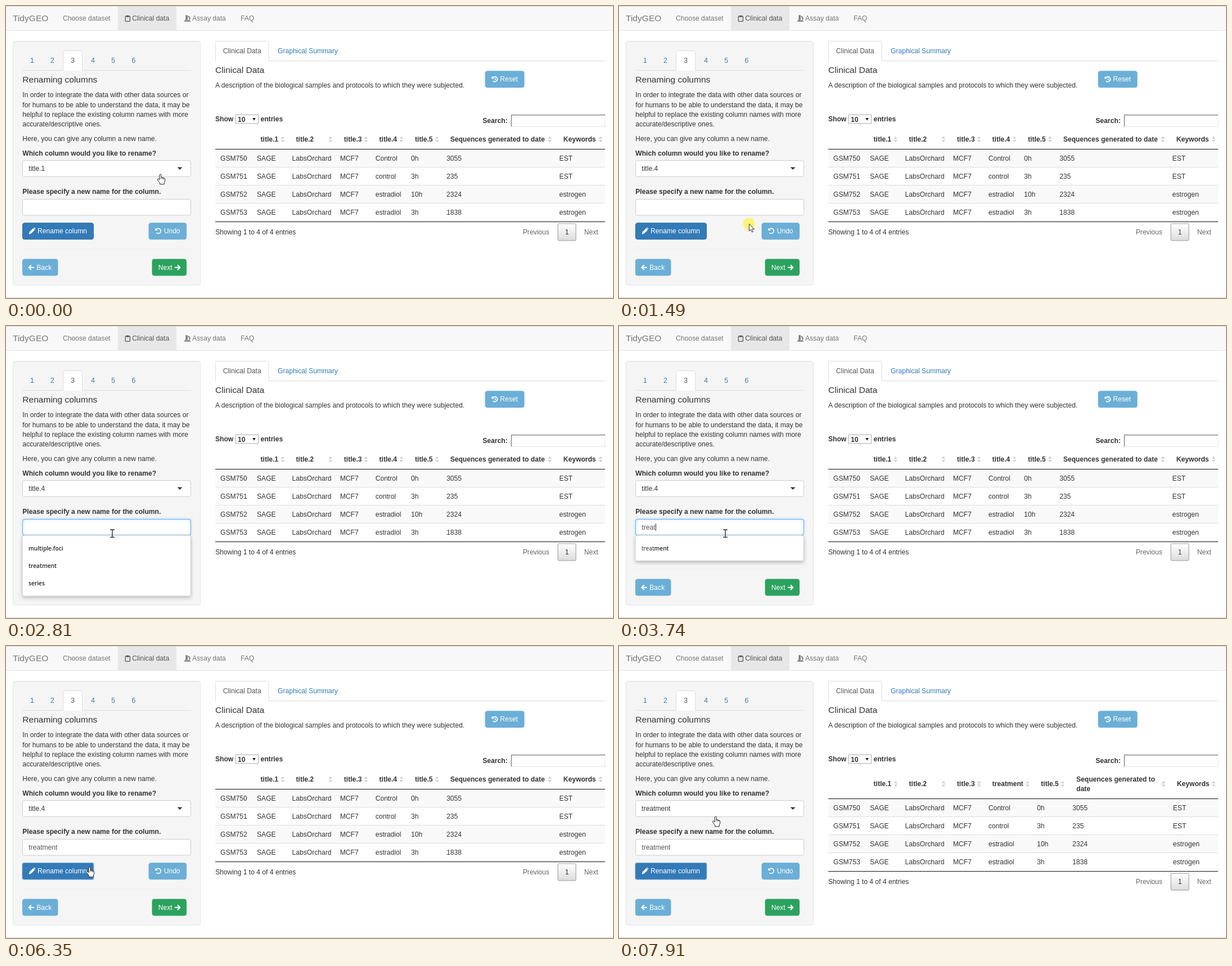
Recreate the animation shown at these times as an HTML page. Size 1079x519 px, loop 7.99 s.

```html
<!DOCTYPE html>
<html lang="en">
<head>
<meta charset="utf-8">
<title>Renaming columns</title>
<style>
html, body { margin: 0; width: 100%; height: 100%; overflow: hidden; background: #fff; }
svg { display: block; width: 1079px; height: 519px; }
text { font: 12.1px "Liberation Sans", Arial, sans-serif; fill: #333; white-space: pre; }
.h { font-size: 15.55px; }
.b { font-weight: 700; }
.mid { text-anchor: middle; }
.nav { fill: #777; }
.dark { fill: #555; }
.link { fill: #337ab7; }
.page { fill: #666; }
.w { fill: #fff; }
.hint { font: 600 10.2px "Open Sans", "Noto Sans", sans-serif; fill: #222; }
.typed { font-weight: 400; }
</style>
</head>
<body>
<svg id="stage" viewBox="0 0 1079 519" xmlns="http://www.w3.org/2000/svg"></svg>
<script>
const LOOP = 7990;
const COLUMNS = ['title.1', 'title.2', 'title.3', 'title.4', 'title.5',
  'Sequences generated to date', 'Keywords'];
const HINTS = ['multiple.foci', 'treatment', 'series'];
const WORD = 'treatment';
const KEYS = [3190, 3340, 3430, 3580, 3740, 4200, 4280, 4430, 4520];
const CLICKS = [[150, 240], [1490, 1560], [2260, 2340], [6210, 6290]];
// start, end, number of steps, destination
const MOVES = [
  [530, 1250, 10, 231, 387],
  [1710, 2090, 6, 189, 368.5],
  [5440, 6130, 10, 148.5, 392.7],
  [7060, 7910, 12, 171.6, 302.8]
];
const HOME = [274.5, 298.8];
const OPTION_TOP = 307, OPTION_H = 22.46;

// y is the vertical centre of the line
const text = (x, y, s, cls = '', id = '') =>
  `<text x="${x}" y="${y + 4.3}" class="${cls}"${id && ` id="${id}"`}>${s}</text>`;
const rect = (x, y, w, h, fill, stroke = 'none', r = 0, more = '') =>
  `<rect x="${x}" y="${y}" width="${w}" height="${h}" rx="${r}" fill="${fill}" stroke="${stroke}" ${more}/>`;
const path = (d, fill = 'none', stroke = 'none', width = 1, more = '') =>
  `<path d="${d}" fill="${fill}" stroke="${stroke}" stroke-width="${width}" ${more}/>`;
const line = (x1, x2, y, color) => path(`M${x1} ${y}H${x2}`, 'none', color);
const group = (body, id = '', at = '') =>
  `<g${id && ` id="${id}"`}${at && ` transform="translate(${at})"`}>${body}</g>`;
const button = (x, y, w, fill, stroke = fill) => rect(x, y, w, 29, fill, stroke, 3.5);
const field = y => rect(29.5, y, 299, 28.5, '#fff', '#ccc', 3.5);
const glow = (y, id) => rect(29.5, y, 299, 28.5, 'none', '#66afe9', 3.5, `id="${id}" filter="url(#blue)"`);

const undoIcon = (x, y, inner = '') => group(
  path('M-3.8-2.4A4.5 4.5 0 1 1-3.2 3.3', 'none', '#fff', 1.7) +
  path('M-5.7-5.3V-.8H-1.2Z', '#fff') + inner, '', `${x} ${y}`);

const arrowIcon = (x, y, flip) =>
  path('M-.2-4.3L-4.4 0L-.2 4.3M-4 0H5', 'none', '#fff', 2,
    `transform="translate(${x} ${y}) scale(${flip} 1)"`);

function navbar() {
  return rect(0, 0, 1079, 44, '#f8f8f8') + rect(199, 1, 104, 43, '#e7e7e7') +
    line(0, 1079, 43.5, '#e4e4e4') + line(0, 1079, .5, '#cfcfcf') + line(0, 1079, 518.5, '#d2d2d2') +
    text(12, 22.5, 'TidyGEO', 'h nav') +
    text(101, 22, 'Choose dataset', 'nav') + text(224.3, 22, 'Clinical data', 'dark') +
    text(331, 22, 'Assay data', 'nav') + text(417, 22, 'FAQ', 'nav') +
    rect(212.2, 18, 8.2, 9.3, 'none', '#555', 1, 'stroke-width="1.3"') +
    path('M214 19.8V17.4H215.2Q216.3 15 217.4 17.4H218.6V19.8Z', '#555') +
    group(path('M-3-5.8H.2V2H-3ZM-2.4 2.6H-.4V3.6H-2.4Z', '#777') +
      path('M.8-3.6Q4.4-2.8 4.2.6Q4 3 2 4.6', 'none', '#777', 1.6) +
      path('M-5.6 5H5.6M-4.6 3.2H.8', 'none', '#777', 1.5), '', '322.5 22');
}

function panel() {
  const copy = ['In order to integrate the data with other data sources or',
    'for humans to be able to understand the data, it may be',
    'helpful to replace the existing column names with more',
    'accurate/descriptive ones.'];
  let s = rect(12.5, 62.5, 333, 433.5, '#f5f5f5', '#e3e3e3', 3.5) +
    line(14, 344, 63.5, '#eeeeee') + line(29, 328.5, 114.5, '#ddd') +
    path('M101.5 115V83Q101.5 79.5 105 79.5H132Q135.5 79.5 135.5 83V115', '#fff', '#ddd');
  for (let i = 0; i < 6; i++)
    s += text(46.3 + 36.1 * i, 97, i + 1, 'mid ' + (i === 2 ? 'dark' : 'link'));
  s += text(29.3, 132, 'Renaming columns', 'h');
  copy.forEach((c, i) => s += text(29.3, 158 + 17.3 * i, c));
  return s + text(29.3, 236, 'Here, you can give any column a new name.') +
    text(29.3, 261.5, 'Which column would you like to rename?', 'b') +
    field(274.7) + glow(274.7, 'selectGlow') + text(40.3, 289, '', '', 'chosen') +
    path('M304.5 286.5H313.5L309 291Z', '#333', 'none', 1, 'id="down"') +
    path('M304.5 291H313.5L309 286.5Z', '#333', 'none', 1, 'id="up"') +
    rect(75, 282.5, 1, 13, '#333', 'none', 0, 'id="selectCaret"') +
    text(29.3, 330, 'Please specify a new name for the column.', 'b') +
    field(343.5) + glow(343.5, 'inputGlow') + text(40.3, 357.5, '', 'dark', 'typed') +
    rect(40.8, 351, 1, 13, '#333', 'none', 0, 'id="caret"') +
    button(29.5, 385.7, 126, '#337ab7', '#2e6da4') +
    rect(28.9, 385.3, 127, 29.8, 'none', '#8bb9e6', 1.5, 'id="ring"') +
    group(path('M-5.5 5.5L-4.7 1.8L2-4.9L5-1.9L-1.8 4.8Z', '#fff') +
      path('M2.7-5.5L3.4-6Q4-6.4 4.7-5.8L5.8-4.7Q6.3-4 5.8-3.3L5.4-2.8Z', '#fff') +
      path('M-3.7 2.1L-2 3.9', 'none', '#337ab7', .8), '', '46.2 400') +
    text(56, 400, 'Rename column', 'w') +
    button(254, 385.7, 66.5, '#6baed6') + undoIcon(270.7, 399.7) + text(280.7, 400, 'Undo', 'w') +
    line(29, 328.5, 432.5, '#eee') +
    button(29.5, 450, 62.5, '#6baed6') + arrowIcon(45, 464.7, 1) + text(54.3, 464.5, 'Back', 'w') +
    button(260, 450, 60.5, '#2ca25f') + arrowIcon(304.8, 464.7, -1) + text(270.8, 464.5, 'Next', 'w');
}

function content() {
  return line(372, 1065, 97.5, '#ddd') +
    path('M372.5 98V66Q372.5 62.5 376 62.5H463.5Q467 62.5 467 66V98', '#fff', '#ddd') +
    text(385.8, 79.7, 'Clinical Data', 'dark') + text(483, 79.7, 'Graphical Summary', 'link') +
    text(372, 114.5, 'Clinical Data', 'h') +
    text(372, 141, 'A description of the biological samples and protocols to which they were subjected.') +
    button(852, 115.8, 69, '#6baed6') +
    undoIcon(869, 130, path('M.4-2.2V.6L2.2 1.7', 'none', '#fff', 1.2)) + text(878.2, 130, 'Reset', 'w') +
    text(372, 201, 'Show', 'b') + rect(408, 193.3, 40.5, 15.5, '#fff', '#a9a9a9') +
    text(412, 201.3, '10', 'b') + path('M438.2 199H443.8L441 203.8Z', '#222') +
    text(452.5, 201, 'entries', 'b') + text(847.3, 203.5, 'Search:', 'b') +
    rect(898, 193.3, 167, 21, '#fff', '#e2e2e2') +
    path('M898.5 214.5V193.8H1065', 'none', '#8e8e8e', 1.5);
}

function table(renamed) {
  const top = renamed ? 271.5 : 254.4;
  const headY = renamed ? 245 : 236.8;
  const headX = renamed ? [452.5, 515.5, 600.8, 663.5, 750, 813, 991.8]
    : [452.5, 515.5, 600.8, 663.5, 727, 789.7, 990.8];
  const sortX = renamed ? [491.7, 576.8, 640, 726, 788.6, 967.8, 1057]
    : [491.7, 576.8, 639.8, 703, 766, 966.6, 1057];
  const cellX = renamed ? [381, 446, 508.5, 593.8, 656.7, 743, 806, 984.8]
    : [381, 446, 508.5, 593.8, 656.7, 720, 783, 983.6];
  const rows = [['Control', '0h', '3055', 'EST'], ['control', '3h', '235', 'EST'],
    ['estradiol', '10h', '2324', 'estrogen'], ['estradiol', '3h', '1838', 'estrogen']];
  let s = '';
  COLUMNS.forEach((name, i) => {
    if (renamed && i === 5)
      s += text(headX[i], 236.8, 'Sequences generated to', 'b') + text(headX[i], 253.8, 'date', 'b');
    else s += text(headX[i], headY, renamed && i === 3 ? WORD : name, 'b');
    s += path('M-3.5-1L0-5.5L3.5-1ZM-3.5 1L0 5.5L3.5 1Z', '#d3d3d3', 'none', 1,
      `transform="translate(${sortX[i]} ${headY + .2})"`);
  });
  rows.forEach((row, i) => {
    const y = top + 32.15 * i;
    if (i % 2 === 0) s += rect(372, y, 693, 32.15, '#f9f9f9');
    if (i) s += line(372, 1065, Math.floor(y) + .5, '#ddd');
    ['GSM75' + i, 'SAGE', 'LabsOrchard', 'MCF7', ...row]
      .forEach((c, k) => s += text(cellX[k], y + 16.1, c));
  });
  const end = top + 128.6;
  s += line(372, 1065, Math.floor(top) + .5, '#111') + line(372, 1065, Math.floor(end) + .5, '#111');
  s += text(372, end + 18.2, 'Showing 1 to 4 of 4 entries') +
    text(918.8, end + 18.5, 'Previous', 'page') + text(1027.8, end + 18.5, 'Next', 'page') +
    rect(981, end + 3.9, 32, 30, 'url(#grey)', '#979797', 1.7) + text(997, end + 18.6, '1', 'mid');
  return s;
}

function options() {
  return path('M29.5 303H328.5V466Q328.5 469.5 325 469.5H33Q29.5 469.5 29.5 466Z', '#fff', '#ccc', 1, 'filter="url(#drop)"') +
    rect(30, 0, 298, OPTION_H, '#f5f5f5', 'none', 0, 'id="hover"') +
    COLUMNS.map((c, i) => text(40.3, OPTION_TOP + OPTION_H * (i + .5), c)).join('');
}

const cursors =
  group(path('M-1.5 1.2Q0-1 1.5 1.2V5.5L6.6 7Q8.4 7.6 8.2 9.6V12L6.6 15.2V18H-.9V15.8L-4.9 10.4Q-5.8 8.4-3.8 8L-1.5 10.2Z', '#fff', '#222', 1, 'stroke-linejoin="round"') +
    path('M1.5 5V9M3.9 6.4V9.2M6.2 7.2V9.6', 'none', '#222', .8), 'hand') +
  group(path('M.4.2V13L3.3 10.3L5.3 15L7.3 14.1L5.3 9.6H9.4Z', '#fff', '#222', .9), 'arrow') +
  group(path('M-3.8-6.5H-1Q0-6.5 0-5.5Q0-6.5 1-6.5H3.8M-3.8 7H-1Q0 7 0 6Q0 7 1 7H3.8M0-5.7V6.2', 'none', '#222', 1.3), 'beam');

document.getElementById('stage').innerHTML = `<defs>
  <linearGradient id="grey" x2="0" y2="1"><stop stop-color="#fff"/><stop offset="1" stop-color="#dcdcdc"/></linearGradient>
  <filter id="blue" x="-5%" y="-40%" width="110%" height="180%"><feDropShadow dx="0" dy="0" stdDeviation="2" flood-color="#66afe9" flood-opacity=".9"/></filter>
  <filter id="drop" x="-5%" y="-10%" width="110%" height="125%"><feDropShadow dx="0" dy="3" stdDeviation="3" flood-opacity=".22"/></filter>
  </defs>` + rect(0, 0, 1079, 519, '#fff') + navbar() + panel() + content() +
  group(table(false), 'before') + group(table(true), 'after') + group(options(), 'options') +
  group(rect(29, 372, 299.5, 108, '#fff', '#c8c8c8', 3, 'id="popup" filter="url(#drop)"') +
    HINTS.map((h, i) => text(40, 394.3 + 31.2 * i, h, 'hint', 'hint' + i)).join(''), 'hints') +
  group('<circle r="10.5" fill="#fff24a" fill-opacity=".75" id="halo"/>' + cursors, 'pointer');

const el = id => document.getElementById(id);
const show = (id, on) => el(id).setAttribute('display', on ? 'inline' : 'none');
const blink = age => Math.floor(age / 530) % 2 === 0;

function pointerAt(t) {
  let [x, y] = HOME;
  for (const [start, end, n, tx, ty] of MOVES) {
    if (t < start) break;
    const step = Math.min(n, Math.floor((t - start) / ((end - start) / (n - 1)) + .001) + 1);
    const p = step / n, e = p * p * (3 - 2 * p);
    x += (tx - x) * e;
    y += (ty - y) * e;
  }
  return [x, y];
}

function shapeAt(x, y, open) {
  if (open || (y > 274 && y < 304)) return 'hand';
  if (y > 343 && y < 372.5) return 'beam';
  return y > 385.5 && y < 415 && x < 156 ? 'hand' : 'arrow';
}

function draw(t) {
  const open = t >= 150 && t < 1490;
  const focus = t >= 2260 && t < 6210;
  const done = t >= 6520;
  const [x, y] = pointerAt(t);

  el('pointer').setAttribute('transform', `translate(${x.toFixed(2)} ${y.toFixed(2)})`);
  const shape = shapeAt(x, y, open);
  ['hand', 'arrow', 'beam'].forEach(c => show(c, c === shape));
  show('halo', CLICKS.some(([a, b]) => t >= a && t < b));

  el('chosen').textContent = t < 1490 ? COLUMNS[0] : t < 6430 ? COLUMNS[3] : WORD;
  ['options', 'selectGlow', 'up'].forEach(id => show(id, open));
  show('down', !open);
  show('selectCaret', open && blink(t - 150));
  const row = Math.max(0, Math.min(6, Math.floor((y - OPTION_TOP) / OPTION_H)));
  el('hover').setAttribute('y', OPTION_TOP + OPTION_H * row);

  const count = KEYS.filter(k => t >= k).length;
  const typed = el('typed');
  typed.textContent = WORD.slice(0, count);
  show('inputGlow', focus);
  show('caret', focus && blink(t - (count ? KEYS[count - 1] : 2270)));
  el('caret').setAttribute('x', 40.8 + (count ? typed.getComputedTextLength() : 0));

  show('hints', t >= 2420 && t < 4520);
  el('popup').setAttribute('height', count ? 45.5 : 108);
  show('hint0', !count);
  show('hint2', !count);
  el('hint1').setAttribute('y', (count ? 394.3 : 425.5) + 4.3);
  el('hint1').innerHTML = `<tspan class="typed">${WORD.slice(0, count)}</tspan>${WORD.slice(count)}`;

  show('ring', t >= 6210);
  show('before', !done);
  show('after', done);
}

const begin = performance.now();
function tick() {
  draw((performance.now() - begin) % LOOP);
  requestAnimationFrame(tick);
}
tick();
</script>
</body>
</html>
```
